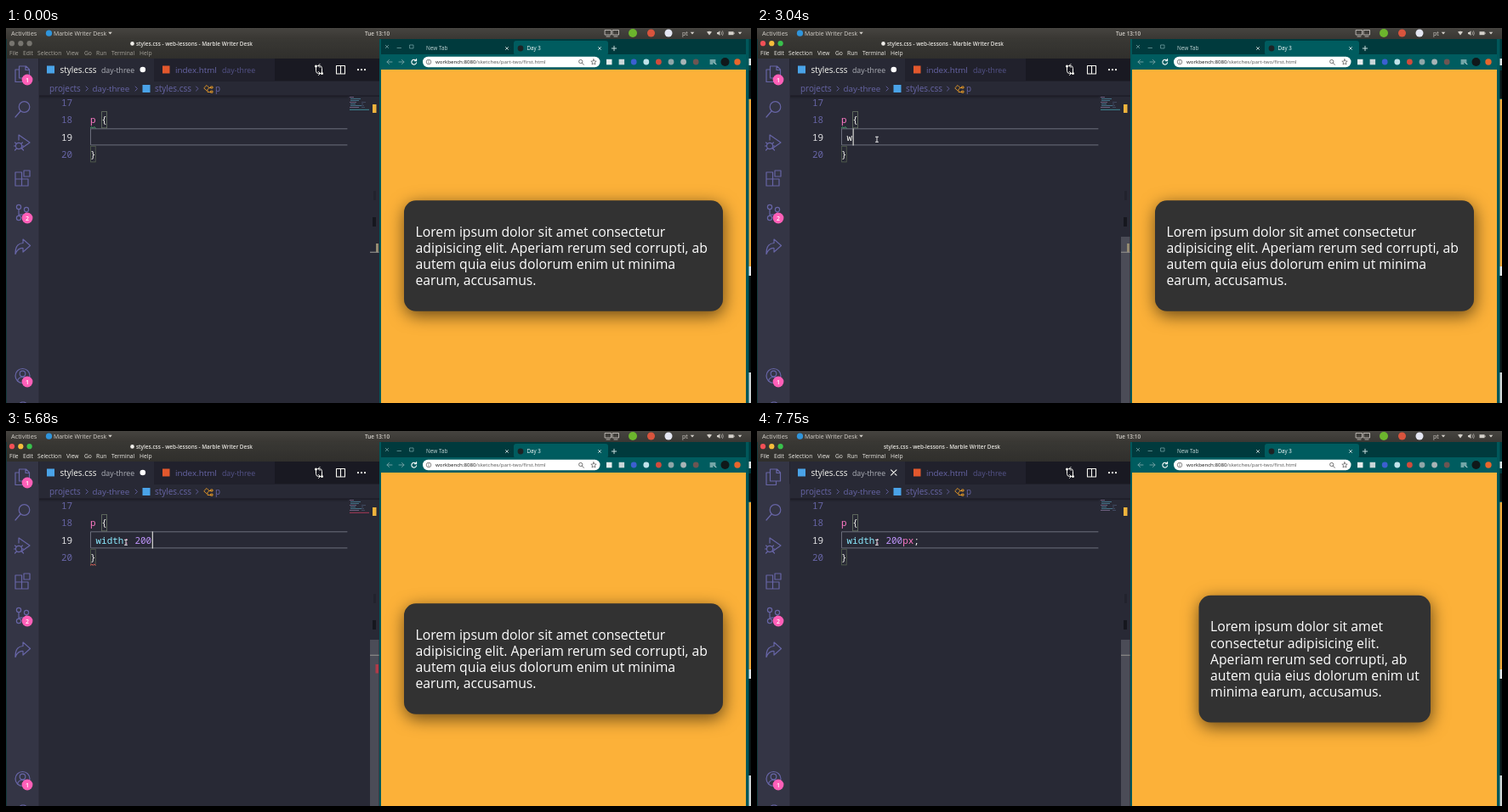
Write an HTML page that moves like this. It is 876x442 px and loops after 8 s.

```html
<!DOCTYPE html>
<html lang="en">
<head>
<meta charset="utf-8">
<title>Editor and preview</title>
<style>
  html, body { margin: 0; width: 100%; height: 100%; overflow: hidden; background: #282935; }
  svg { display: block; }
  text { font-family: "Open Sans", "Noto Sans", sans-serif; white-space: pre; }
  .mono { font-family: "Noto Sans Mono", "DejaVu Sans Mono", monospace; font-size: 10.95px; }
  .line { fill: none; stroke-linecap: round; stroke-linejoin: round; }
  .card { filter: drop-shadow(1px 5px 10px rgba(0, 0, 0, .6)); }
</style>
</head>
<body>
<svg id="stage" width="876" height="442" viewBox="0 0 876 442"></svg>
<script>
const LOOP = 8000, CHAR = 6.57, CODE_X = 99, ROW = 20.36;
const PINK = '#ff79c6', CYAN = '#8be9fd', PURPLE = '#bd93f9', WHITE = '#f8f8f2', DIM = '#6765a6', EDITOR = '#282935';

const box = (x, y, w, h, fill, extra = '') =>
  `<rect x="${x}" y="${y}" width="${w}" height="${h}" fill="${fill}" ${extra}/>`;
const dot = (x, y, r, fill, extra = '') => `<circle cx="${x}" cy="${y}" r="${r}" fill="${fill}" ${extra}/>`;
const ring = (x, y, r, color, w) => dot(x, y, r, 'none', `stroke="${color}" stroke-width="${w}"`);
const text = (x, y, size, fill, str, extra = '') =>
  `<text x="${x}" y="${y}" font-size="${size}" fill="${fill}" ${extra}>${str}</text>`;
const mono = (x, y, fill, str, extra = '') => `<text class="mono" x="${x}" y="${y}" fill="${fill}" ${extra}>${str}</text>`;
const span = (fill, str, extra = '') => `<tspan fill="${fill}" ${extra}>${str}</tspan>`;
const path = (d, color, w = 1) => `<path class="line" d="${d}" stroke="${color}" stroke-width="${w}"/>`;
const cross = (x, y, r, color, w) => path(`M${x - r} ${y - r}l${2 * r} ${2 * r}m0 ${-2 * r}l${-2 * r} ${2 * r}`, color, w);
const wave = (x, y, color) => path(`M${x} ${y}l1.5 -1.5l1.5 1.5l1.5 -1.5l1.5 1.5`, color, .8);
const badge = (y, n) => dot(25, y, 6.4, '#ff5fb8') +
  text(25, y + 2.5, 7, '#fff', n, 'text-anchor="middle" font-weight="600"');
const chevron = (x, y) => path(`M${x} ${y - 2.5}l2.5 2.5l-2.5 2.5`, DIM, .9);
const triangle = (x, y, c) => `<path d="M${x - 2.3} ${y - 1.2}h4.6l-2.3 2.7z" fill="${c}"/>`;
const shade = (id, top, bottom) => `<linearGradient id="${id}" x2="0" y2="1">
  <stop stop-color="${top}"/><stop offset="1" stop-color="${bottom}"/></linearGradient>`;

function topBar() {
  const c = '#d3cfc9';
  return shade('panel', '#464440', '#393733') + shade('frame', '#393834', '#302f2c') +
    box(0, 0, 876, 13, 'url(#panel)') +
    text(6, 8.8, 7.4, c, 'Activities') + dot(50.5, 6.2, 3.6, '#2f95dc') +
    text(56, 8.8, 6.9, c, 'Marble Writer Desk') + triangle(122.5, 6, c) +
    text(422, 8.6, 6.4, c, 'Tue 13:10', 'font-weight="600"') +
    path('M704.5 2.5h7v5.5h-7zM706 10h4M713.5 2.5h7v5.5h-7zM715 10h4', c, .8) +
    dot(737, 6, 5, '#6cb52d') + dot(758.5, 6, 4.5, '#d9543d') + dot(779, 6, 4.5, '#e4e6f2') +
    text(795, 8.6, 7, c, 'pt') + triangle(807, 6, c) +
    `<path d="M824 4.6q3 -1.8 6 0l-3 4zM836 5h1.4l2 -1.7v5.6l-2 -1.7H836z" fill="${c}"/>` +
    path('M841.2 4.7q1.1 1.4 0 3M842.6 3.6q1.8 2.5 0 5.2', c, .6) +
    box(849.5, 4.2, 6, 4, c) + box(855.5, 5.3, 1, 1.8, c) + triangle(863, 6, c);
}

function activityBar() {
  const p = d => path(d, DIM, 1.2);
  return box(1, 36, 37.5, 406, '#343545') +
    p('M15.5 45h8l4 4v10h-12zM23 45v4.5h4.5M15 49h-4v14.5h11.5v-4') +
    p('M17 98l-6 7') + ring(21.5, 93, 6.3, DIM, 1.2) +
    p('M15 132v-6l13 9l-10 7') + ring(15, 139, 3.6, DIM, 1.2) +
    p('M10.5 135l2 1.5m7 -1.5l-2 1.5m-8 2.5h2m7 0h2m-10 5l2 -2m6 0l2 2') +
    p('M11 170h7.5v16H11zM11 178h15v8H18.5v-8M21 168h7v7h-7z') +
    ring(15, 211, 2.6, DIM, 1.2) + ring(15, 224, 2.6, DIM, 1.2) + ring(24, 214, 2.6, DIM, 1.2) +
    p('M15 214v7M24 217q0 4 -9 3') +
    p('M20 249l8.5 7.5l-8.5 7.5v-4.5q-6 -.5 -9 7q-.5 -12.5 9 -13z') +
    ring(19.5, 410, 8.5, DIM, 1.2) + ring(19.5, 407.5, 3.3, DIM, 1.2) + p('M13.5 416q1 -4.5 6 -4.5t6 4.5') +
    p('M16 442.5l2.5 -1.5h3l2.5 1.5') + badge(224, 2) + badge(417, 1);
}

function editor() {
  let s = box(0, 13, 441, 429, '#12393b') + box(1, 13, 438, 23, 'url(#frame)') +
    box(1, 36, 438, 406, EDITOR) + activityBar() +
    box(38.5, 36, 400.5, 26.5, '#191922') + box(39, 36, 135, 27, EDITOR) + box(174, 36, 142, 26.5, '#21212c') +
    box(48, 44.5, 9, 9, '#4aa3e8') + text(63.5, 52.6, 9.95, WHITE, 'styles.css') +
    text(112, 52.6, 8.75, '#aeb0b8', 'day-three') +
    box(184, 44.5, 8.5, 9, '#e2582d') + text(199, 52.6, 9.85, DIM, 'index.html') +
    text(254, 52.6, 8.75, '#55548a', 'day-three') +
    path('M364.5 46v4.5q0 3 3 3h2m-2 -2l2 2l-2 2M371.5 52v-4.5q0 -3 -3 -3h-1.5m2 -2l-2 2l2 2', WHITE, 1) +
    dot(364.5, 45, 1.5, WHITE) + dot(371.5, 53.5, 1.5, WHITE) +
    path('M388.5 44.5h10v9.5h-10zM393.5 44.5v9.5', WHITE, 1.1) +
    [414, 418, 422].map(x => dot(x, 49.2, 1.1, WHITE)).join('');
  s += text(51, 75, 9.9, DIM, 'projects') + chevron(94, 71.5) + text(101.5, 75, 9.8, DIM, 'day-three') +
    chevron(152, 71.5) + box(160.5, 67, 9, 9, '#4aa3e8') + text(175, 75, 9.95, DIM, 'styles.css') + chevron(223.5, 71.5) +
    path('M233 70.5l3 -3l3 3l-3 3zM239 70.5h2m-4 3v2h4M241 69h2v2h-2zM241 74.2h2v2h-2z', '#ee9d28', .9) +
    text(246, 75, 9.9, DIM, 'p');
  for (let i = 0; i < 4; i++)
    s += mono(65, 92 + i * ROW, i === 2 ? '#e4e4e6' : DIM, 17 + i);
  s += box(39, 79.5, 400, 1.2, '#1b1b24') + box(39, 80.7, 363, 2, '#1b1b24', 'opacity=".45"');
  s += path('M401 118.8H99.5V137.9H401', '#6c6e7c');
  s += box(112.6, 98.6, 6, 19.2, 'none', 'stroke="#6a7766" stroke-width=".8"') +
    box(99.6, 139.3, 5.6, 18.6, 'none', 'stroke="#55614f" stroke-width=".8"') +
    mono(CODE_X, 112.2, PINK, 'p') + mono(CODE_X + 2 * CHAR, 112.2, WHITE, '{') + mono(CODE_X, 153, WHITE, '}');
  for (let i = 0; i < 7; i++)
    s += box(404 + (i % 3 ? 1 : 0), 81 + i * 2, 5 + i * 7 % 9, 1, i % 3 ? '#467389' : '#6d6080') +
      (i > 2 ? box(418, 81 + i * 2, 2 + i % 4, .8, '#47536c') : '');
  return s + box(431, 90, 4.5, 10, '#f0b33c') + box(432, 192, 3, 11, '#22232d') + box(431, 223, 4, 11, '#16171e');
}

function browser() {
  const w = '#dcebeb', faint = '#6f9da0', ink = '#555';
  const icons = ['#e6ecec', '#c9d6d8', '#3c5fd0', '#bfe3ea', '#d24b3c', '#8fa6a8', '#a8b4b6', '#6d5552'];
  let s = box(439, 13, 437, 429, '#00575a') + box(441, 13, 429, 18.5, '#003a3d') +
    box(597, 15, 111, 17, '#005c5f', 'rx="3"') + box(441, 31, 429, 18, '#005c5f') +
    cross(448, 22, 1.7, faint, .8) + path('M460 23.5h4.5M475 20h4v4h-4z', faint, .8) +
    text(494, 26.3, 6.4, '#c4d6d6', 'New Tab') + cross(589, 24, 1.5, w, .8) +
    dot(605, 24, 3.4, '#1d2325') + text(612.5, 26.3, 6.2, '#fff', 'Day 3') + cross(698, 24, 1.5, w, .8) +
    path('M712.3 24h5.4M715 21.3v5.4', w, .9) +
    path('M454 40h-6m2.5 -2.5l-2.5 2.5l2.5 2.5M462 40h6m-2.5 -2.5l2.5 2.5l-2.5 2.5', faint) +
    path('M482 38.3a2.9 2.9 0 1 0 .6 2.6M482.6 36.5v2.3h-2.3', '#fff', 1.1) +
    box(490, 33.8, 208.5, 12.4, '#fff', 'rx="6.2"') +
    ring(497, 40, 2.8, ink, .7) + path('M497 39.8v1.6M497 38.4v.1', ink, .7) +
    text(505, 42.3, 6.15, ink, span('#111', 'workbench:8080') + '/sketches/part-two/first.html') +
    ring(675.7, 39.5, 2.1, ink, .8) + path('M677.4 41.2l2 2', ink, .9) +
    path('M691 36.8l.9 2.2l2.3 .2l-1.8 1.5l.6 2.3l-2 -1.2l-2 1.2l.6 -2.3l-1.8 -1.5l2.3 -.2z', ink, .7);
  icons.forEach((c, i) => s += i < 2 ? box(706 + i * 14.6, 36.8, 6.5, 6.5, c) : dot(709 + i * 14.6, 40, 3.4, c));
  return s + path('M828 38h6M828 40h6M828 42h3M833 41.5l2 1', '#fff', .9) +
    dot(845.5, 40, 5, '#10181a') + dot(860, 40, 3.7, '#e8662c') +
    box(441, 49, 429, 393, '#fcb139') +
    box(873.5, 13, 2.5, 37, '#003a3d') + box(873.5, 36, 2.5, 8, '#dfe8e8') + box(873.5, 50, 2.5, 33, '#0b1516') +
    box(873.5, 84, 2.5, 197, '#f0a93a') + box(873.5, 281, 2.5, 11, '#e8eaea') + box(873.5, 292, 2.5, 114, '#0b1516') +
    box(873.5, 406, 2.5, 36, '#cfd6d6');
}

const wide = { x: 468, y: 203.3, w: 375, h: 130.5, lines: [
  'Lorem ipsum dolor sit amet consectetur', 'adipisicing elit. Aperiam rerum sed corrupti, ab',
  'autem quia eius dolorum enim ut minima', 'earum, accusamus.'] };
const narrow = { x: 519.5, y: 193.8, w: 272.5, h: 149.7, lines: [
  'Lorem ipsum dolor sit amet', 'consectetur adipisicing elit.', 'Aperiam rerum sed corrupti, ab',
  'autem quia eius dolorum enim ut', 'minima earum, accusamus.'] };
const card = c => box(c.x, c.y, c.w, c.h, '#323232', 'rx="14" class="card"') +
  c.lines.map((l, i) => text(c.x + 13.5, c.y + 42.6 + i * 19.1, 15.76, '#fff', l)).join('');

const widths = 'max-width min-width border-width stroke-width column-width outline-width';
const lists = {
  w: 'width white-space widows will-change word-break word-spacing word-wrap writing-mode max-width',
  wi: `width widows will-change ${widths}`,
  wid: `width widows ${widths} -moz-window-dragging`,
  widt: `width ${widths} border-top-width border-left-width`,
  'width:': 'auto fit-content max-content min-content 0% 0ch 0cm 0em 0ex',
  '200p': '200pc 200pt 200px',
  '200px': '200px'
};
lists.width = lists.widt;

function itemIcon(kind, y) {
  if (kind === 'prop')
    return path(`M93.5 ${y + 3.5}l4.5 -4.5a2.8 2.8 0 0 1 3.2 -3.6l-1.6 1.8l1.4 1.4l1.7 -1.6a2.8 2.8 0 0 1 -3.6 3.2l-4.3 4.5z`, '#e0e0e4', .9);
  if (kind === 'value')
    return path(`M96.5 ${y - 1}v-3h6v4.5h-3M92.5 ${y - .5}h6v4.5h-6zM94 ${y + 1.2}h3M98.5 ${y - 2.2}h2.5`, '#ee9d28', 1);
  return path(`M94 ${y - 5}h6.5v10H94zM94 ${y - 2.5}h2.5M94 ${y}h2.5M94 ${y + 2.5}h2.5`, '#e0e0e4', .9);
}

function popup(key) {
  const items = lists[key].split(' '), long = items.length > 8;
  let s = box(89.5, 139.7, 337, items.length * ROW - (long ? 3 : 0), '#201f2a', 'stroke="#4a4a58" stroke-width=".8"') +
    box(90, 140, 336.5, 19.8, '#464559');
  items.forEach((item, i) => {
    const y = 150 + i * ROW, old = item[0] === '-';
    const kind = /^\d/.test(item) ? 'unit' : key === 'width:' ? 'value' : 'prop';
    const label = old ? item : item.replace(key, m => span(CYAN, m, 'font-weight="700"'));
    s += itemIcon(kind, y) + mono(107, y + 4, old ? '#8d8c96' : WHITE, label, old ? 'text-decoration="line-through"' : '');
  });
  return long ? s + box(419, 140, 7.5, key === 'width:' ? 69 : 28, '#5b5a69') : s;
}

function code(str) {
  const [, prop, colon, num, unit, end] = str.match(/^([a-z]*)(: ?)?(\d*)(p?x?)(;?)$/);
  return mono(CODE_X + CHAR, 132.5, WHITE, span(colon ? CYAN : WHITE, prop) + span(PINK, colon || '') +
    span(PURPLE, num) + span(PINK, unit) + span(WHITE, end));
}

function pointer([x, y]) {
  if (x < 439) return path(`M${x - 1.5} ${y - 3}h3m-1.5 0v6m-1.5 0h3`, '#f4f4f4', .9);
  return `<path d="M${x} ${y}v10l2.4 -2.2l1.7 3.6l1.6 -.8l-1.7 -3.4h3.2z" fill="#111" stroke="#fff" stroke-width=".7"/>`;
}

function titleBar(s) {
  const tone = s.focus ? '#efede8' : '#a5a29b';
  const lights = s.focus ? ['#f25056', '#f6bd3b', '#39c14c'] : ['#77756f', '#77756f', '#77756f'];
  const menu = [[4, 'File'], [20, 'Edit'], [37, 'Selection'], [71, 'View'], [92, 'Go'], [106, 'Run'], [124, 'Terminal'], [157, 'Help']];
  return lights.map((c, i) => dot(7 + i * 10.3, 18.2, 3.1, c)).join('') +
    (s.saved ? '' : dot(148.5, 18.4, 2.3, '#f0eeea')) +
    text(s.saved ? 149 : 153, 20.6, 6.4, '#e6e4df', 'styles.css - web-lessons - Marble Writer Desk', 'font-weight="600"') +
    menu.map(([x, m]) => text(x, 32.3, 6.7, tone, m)).join('');
}

function draw(s) {
  let out = titleBar(s);
  out += s.saved ? cross(160.8, 49, 3.2, WHITE, 1.1) : dot(160.8, 49, 3.3, '#fff') + badge(61, 1);
  if (s.mouse && s.mouse[0] < 439) out += box(428, 246, 10.5, 196, '#4b4c57');
  if (s.mark === 'error')
    out += box(434.5, 275, 3.5, 10.5, '#b03a48') + box(404, 95.8, 23, 1, '#a83a58') + wave(99.3, 158.3, '#ff5555');
  if (s.mark === 'hint')
    out += box(435, 254, 3, 10.5, '#948a70') + box(404, 95.8, 23, 1, '#3f8a98') + wave(99.3, 118, '#5fd38a');
  out += box(428, 263.7, 10.5, 1.2, '#8b8a88') + code(s.text);
  if (s.caret) out += box(CODE_X + CHAR * (1 + s.text.length) + .5, 118.5, 1, 20, WHITE);
  if (s.list) out += popup(s.list);
  out += card(s.saved ? narrow : wide);
  return out + (s.mouse ? pointer(s.mouse) : '');
}

// Each step changes part of the state and keeps the rest.
const start = { text: '', mark: 'hint', caret: 0, focus: 0, saved: 0, list: '', mouse: null };
const glide = [...Array(9)].map((_, i) => {
  const rest = (1 - i / 8) ** 1.8;
  return [700 + 95 * i, { mouse: [141 + 727 * rest, 131.3 + 298 * rest ** 1.25] }];
});
const typed = (t, str, list = '') => [t, { text: str, list, caret: 1 }];
const steps = [
  [0, {}], ...glide,
  [1660, { focus: 1, caret: 1 }], [2050, { caret: 0 }], [2550, { caret: 1 }],
  typed(3040, 'w'), typed(3135, 'w', 'w'), typed(3230, 'wi', 'wi'), typed(3420, 'wid', 'wid'),
  typed(3620, 'widt', 'widt'), typed(3820, 'width', 'width'),
  typed(4210, 'width:'), typed(4310, 'width:', 'width:'), [4500, { mark: 'error' }],
  typed(4690, 'width: '), [5190, { caret: 0 }],
  typed(5380, 'width: 2'), typed(5480, 'width: 20'), typed(5680, 'width: 200'),
  typed(5880, 'width: 200p', '200p'), typed(5970, 'width: 200px', '200px'),
  [6470, { caret: 0, mark: '' }], [6960, { caret: 1 }],
  typed(7260, 'width: 200px;'), [7450, { saved: 1 }], [7750, { caret: 0 }]
];

const stage = document.getElementById('stage');
stage.innerHTML = topBar() + editor() + browser() + '<g id="live"></g>';
const live = document.getElementById('live');
const t0 = performance.now();
let shown = -1;

function tick() {
  const t = (performance.now() - t0) % LOOP;
  const count = steps.filter(([at]) => at <= t).length;
  if (count !== shown) {
    shown = count;
    live.innerHTML = draw(Object.assign({}, start, ...steps.slice(0, count).map(([, change]) => change)));
  }
  requestAnimationFrame(tick);
}
tick();
</script>
</body>
</html>
```
